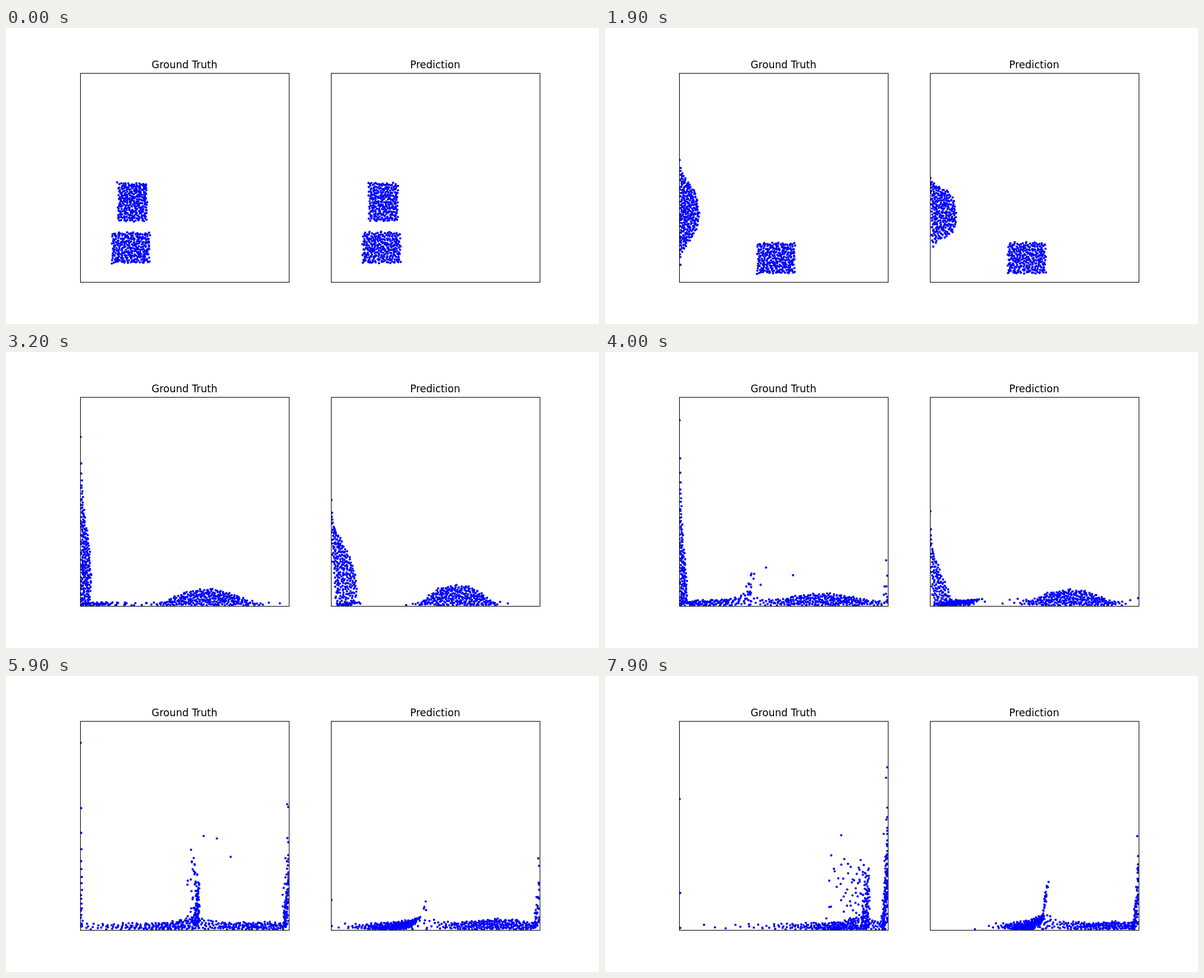
An HTML page with a canvas that plays this animation: 1000 px wide and 500 px high, repeating every 8000 ms.

```html
<!DOCTYPE html>
<html lang="en">
<head>
<meta charset="utf-8">
<title>Ground Truth and Prediction</title>
<style>
  html, body { margin: 0; width: 100%; height: 100%; overflow: hidden; background: #fff; }
  canvas, svg { position: absolute; left: 0; top: 0; width: 1000px; height: 500px; }
  text { font: 17px "DejaVu Sans", sans-serif; text-anchor: middle; }
  rect { fill: none; stroke: #000; stroke-width: 1; }
</style>
</head>
<body>
<canvas id="stage" width="1000" height="500"></canvas>
<svg viewBox="0 0 1000 500">
  <text x="301" y="68">Ground Truth</text>
  <text x="723.7" y="68">Prediction</text>
  <rect x="125.5" y="76.5" width="352" height="353"/>
  <rect x="548.5" y="76.5" width="352" height="353"/>
</svg>
<script>
const STEP = 100, STEPS = 80, COUNT = 285;
const FLOOR = 429, WALL = 351, GRAVITY = 0.25, RADIUS = 1.95;
const ctx = document.getElementById("stage").getContext("2d");
const clamp = (n, lo, hi) => Math.min(hi, Math.max(lo, n));

let seed = 7;
const random = () => (seed = seed * 16807 % 2147483647) / 2147483647;
const jitter = () => (random() - 0.5) * 3;

// kick: strength of the splash; run: share of the falling speed kept along the floor;
// front: the line where the two floods meet and throw drops up.
const panels = [
  { left: 125, kick: { upper: 1.6, lower: 1.4 }, run: 1, drag: 0.01, rebound: 0,
    front: { start: 33, x: 95, speed: 2.6, gain: 0.045 },
    stray: { start: 36, x: 99, h: 22, vx: 5.72, vh: 8.64 } },
  { left: 548, kick: { upper: 0.75, lower: 0.87 }, run: 0.65, drag: 0.02, rebound: 1.5,
    front: { start: 38, x: 121, speed: 1.7, gain: 0 } }
];

// u runs along the axis in which a block spreads on impact, v across it.
function makeDrop(i, upper, kick) {
  const u = i / (COUNT - 1), v = i * 0.618034 % 1;
  const start = upper
    ? { x: 64 + 49 * v, h: 167 - 64 * u, vx: -4.4, hit: 14, length: 64, depth: 49 }
    : { x: 54 + 63 * u, h: 32 + 52 * v, vx: 4.1, hit: 22, length: 63, depth: 52 };
  return { ...start, u, v, upper, kick, vh: 1.45, mode: "fly", tossed: false, dx: jitter(), dh: jitter() };
}

// As the block spreads its depth shrinks, so that its area stays the same.
function depthAt(d, t) {
  const spread = d.kick / ((d.u + 0.001) * (1.001 - d.u));
  return d.depth * d.length / (d.length + (t - d.hit) * spread);
}

function frontAt({ start, x, speed, gain }, t) {
  const s = t - start;
  return { active: s >= 0, x: x + speed * s + gain * s * s, v: speed + 2 * gain * s };
}

function sheetDepth(x, t, front) {
  const mound = front.active ? 1.5 * Math.exp(-Math.abs(x - front.x) / 25) : 0;
  return clamp((t - 20) / 2.5, 3, 10) * (1 + mound);
}

function impact(d) {
  const push = d.kick * Math.log((d.u + 0.001) / (1.001 - d.u));
  if (d.upper) d.vh -= push;
  else d.vx += push;
  d.mode = d.upper ? "slide" : "floor";
}

function runOnFloor(d, t, panel, front) {
  d.vx *= 1 - panel.drag;
  d.x += d.vx;
  const sheet = sheetDepth(d.x, t, front);
  d.h = 1 + d.v * (d.upper ? sheet : Math.max(sheet, depthAt(d, t)));
  const met = d.upper ? d.x > front.x : d.x < front.x;
  if (d.x >= WALL - 10 * (1 - d.v)) {
    d.mode = "climb";
    d.vh = 0.7 * d.vx + 5 * d.v;
  } else if (front.active && met && !d.tossed) {
    d.mode = "toss";
    d.tossed = true;
    d.vh = 0.5 * Math.abs(d.vx - front.v) + 5 * d.v;
    d.vx = 1.25 * front.v;
  }
}

function moveInAir(d, t, panel, front) {
  d.h += d.vh - GRAVITY / 2;
  d.vh -= GRAVITY;
  if (d.mode === "slide") {
    d.x = 1 + d.v * depthAt(d, t) + panel.rebound * (t - d.hit) * d.u * (0.3 + 0.7 * d.v);
  } else if (d.mode !== "climb") {
    d.x += d.vx;
  }
  const ground = 1 + d.v * sheetDepth(d.x, t, front);
  if (d.mode === "fly" || d.vh > 0 || d.h > ground) return;
  if (d.mode === "slide") d.vx = -d.vh * panel.run;
  if (d.mode === "climb") d.vx = d.vh * 0.15;
  d.h = ground;
  d.mode = "floor";
}

function advance(d, t, panel) {
  const front = frontAt(panel.front, t);
  if (d.mode === "fly" && t > d.hit) impact(d);
  (d.mode === "floor" ? runOnFloor : moveInAir)(d, t, panel, front);
}

function record(panel) {
  const drops = [];
  for (let i = 0; i < COUNT; i++) {
    drops.push(makeDrop(i, true, panel.kick.upper), makeDrop(i, false, panel.kick.lower));
  }
  return Array.from({ length: STEPS }, (_, t) => {
    if (t) drops.forEach(d => advance(d, t, panel));
    return drops.map(d => [clamp(d.x + d.dx, 0.8, WALL), Math.max(1, d.h + d.dh)]);
  });
}

function drawPanel({ left, history, stray }, t) {
  const dot = (x, h) => {
    ctx.moveTo(left + x + RADIUS, FLOOR - h);
    ctx.arc(left + x, FLOOR - h, RADIUS, 0, Math.PI * 2);
  };
  ctx.save();
  ctx.beginPath();
  ctx.rect(left, 76, 353, 354);
  ctx.clip();
  ctx.beginPath();
  history[t].forEach(([x, h]) => dot(x, h));
  if (stray && t >= stray.start) {
    const s = t - stray.start;
    dot(stray.x + stray.vx * s, stray.h + stray.vh * s - GRAVITY / 2 * s * s);
  }
  ctx.fillStyle = "#00f";
  ctx.fill();
  ctx.restore();
}

panels.forEach(panel => { panel.history = record(panel); });

let shown = -1;
function tick() {
  const t = Math.floor(performance.now() / STEP) % STEPS;
  if (t !== shown) {
    shown = t;
    ctx.clearRect(0, 0, 1000, 500);
    panels.forEach(panel => drawPanel(panel, t));
  }
  requestAnimationFrame(tick);
}
tick();
</script>
</body>
</html>
```
